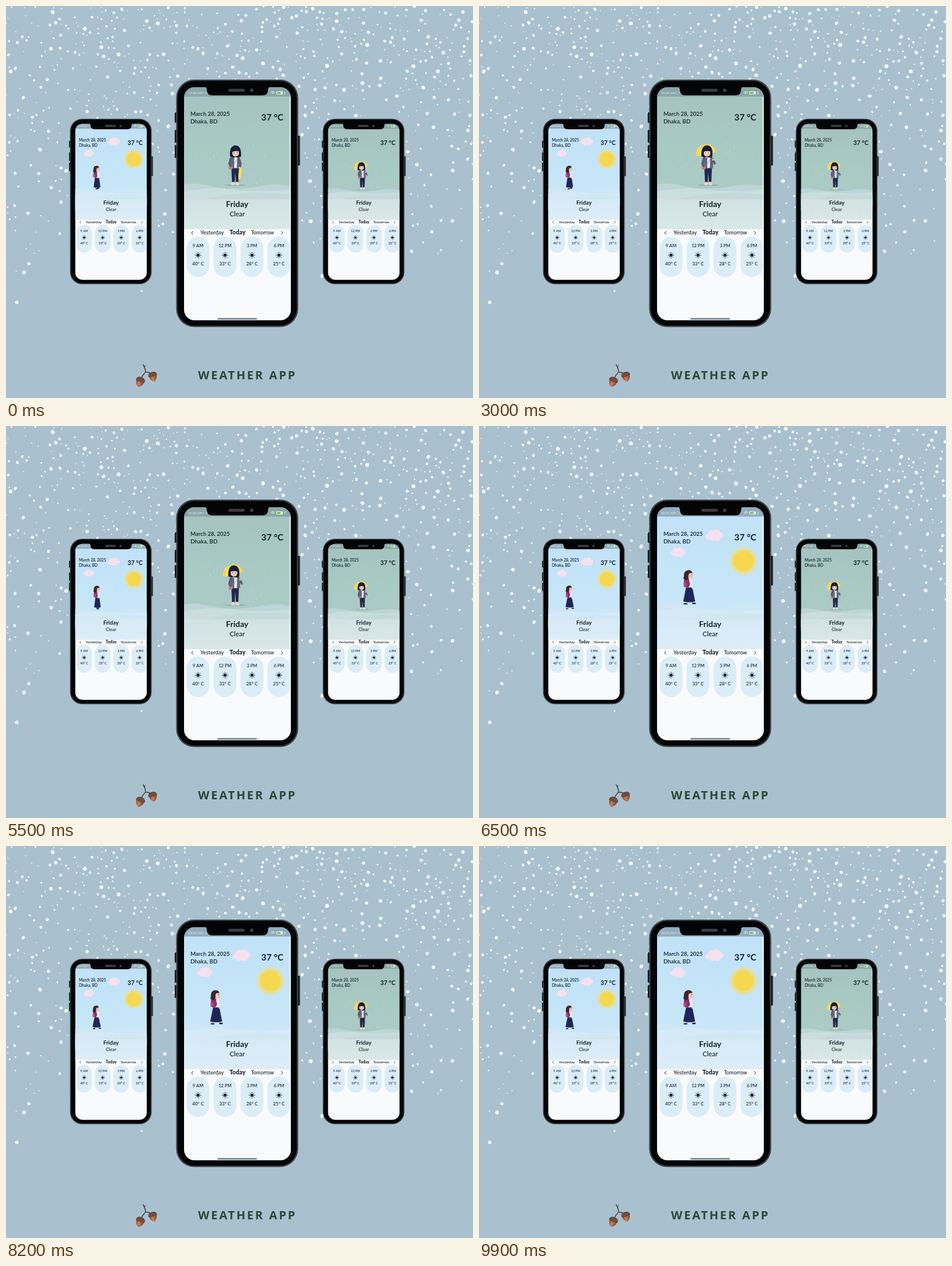
Animation of 800x671 px, one loop 10000 ms. Source, as an HTML page with a canvas:

```html
<!DOCTYPE html>
<html lang="en">
<head>
<meta charset="utf-8">
<title>Weather app</title>
<style>
html, body { margin: 0; width: 100%; height: 100%; overflow: hidden; background: #a9c1cf; }
canvas { display: block; }
</style>
</head>
<body>
<canvas id="stage" width="800" height="671"></canvas>
<script>
const ctx = document.getElementById('stage').getContext('2d');
const LOOP = 10000, SUNNY_AT = 5600;
const mix = (a, b, k) => a + (b - a) * k;
const ease = (t, from, to) => {
  const k = Math.min(1, Math.max(0, (t - from) / (to - from)));
  return k * k * (3 - 2 * k);
};

function box(x, y, w, h, r, color) {
  ctx.fillStyle = color;
  ctx.beginPath();
  ctx.roundRect(x, y, w, h, r);
  ctx.fill();
}
function oval(x, y, rx, ry, color, turn = 0) {
  ctx.fillStyle = color;
  ctx.beginPath();
  ctx.ellipse(x, y, rx, ry, turn, 0, 7);
  ctx.fill();
}
function shape(d, color) {
  ctx.fillStyle = color;
  ctx.fill(new Path2D(d));
}
function line(d, color, width) {
  ctx.strokeStyle = color;
  ctx.lineWidth = width;
  ctx.lineCap = ctx.lineJoin = 'round';
  ctx.stroke(new Path2D(d));
}
function text(s, x, y, size, weight = 400, align = 'left', color = '#15222b') {
  ctx.font = `${weight} ${size}px Lato, sans-serif`;
  ctx.textAlign = align;
  ctx.fillStyle = color;
  ctx.fillText(s, x, y);
}
function fade(y0, y1, ...colors) {
  const g = ctx.createLinearGradient(0, y0, 0, y1);
  colors.forEach((c, i) => g.addColorStop(i / (colors.length - 1), c));
  return g;
}

// Snow thins out towards the bottom; flakes keep their distance.
let seed = 41;
const rand = () => (seed = seed * 16807 % 2147483647) / 2147483647;
const flakes = [];
for (let tries = 0; flakes.length < 880 && tries < 20000; tries++) {
  const x = rand() * 800, y = rand() * 537, r = 0.9 + 2.5 * rand() ** 1.7;
  if (rand() > (1 - y / 545) ** 1.45) continue;
  if (flakes.some(f => Math.hypot(f.x - x, f.y - y) < f.r + r + 3)) continue;
  flakes.push({ x, y, r, flat: 0.78 + rand() * 0.22, turn: rand() * 3 });
}

function cloud(x, y, s) {
  for (const [dx, dy, r] of [[-10, 2, 5], [-4, -3, 6], [4, -4, 6.5], [10, 0, 5.5], [-3, 4, 6], [5, 5, 5.5]])
    oval(x + dx * s, y + dy * s, r * s, r * s * 0.95, '#f7e1ee');
}

function umbrella(open, lift) {
  const x = mix(mix(401, 406, open), 389, lift), y = mix(mix(287, 276, open), 253, lift);
  const rx = mix(mix(2.6, 14, open), 17, lift), ry = mix(mix(11, 15, open), 16.5, lift);
  const low = mix(ry, 2, lift);
  ctx.save();
  ctx.translate(x, y);
  ctx.rotate(mix(0.12, -0.24, lift));
  ctx.fillStyle = '#f6dc5c';
  ctx.beginPath();
  ctx.ellipse(0, 0, rx, ry, 0, Math.PI, 2 * Math.PI);
  ctx.ellipse(0, 0, rx, low, 0, 0, Math.PI);
  ctx.fill();
  if (open > 0.4) {
    const top = -ry * lift;
    for (const k of [-0.9, -0.35, 0.35, 0.9])
      line(`M0 ${top} Q${rx * k} ${top * 0.5} ${rx * k} ${low * 0.5}`, '#e7c443', 0.6);
    line(`M0 ${top} V${top - 2}`, '#d7b142', 1);
  } else {
    line(`M0 -11 V-15 M0 11 V14`, '#8a7150', 0.8);
  }
  ctx.restore();
}

function rainGirl(t, open, lift) {
  const front = open * (1 - lift);
  const sway = 0.6 * Math.sin(t / 420) * lift;
  const hx = 393 + 3 * front - 3 * lift + sway;
  oval(393, 306.5, 18, 1, '#90aaa9');
  if (lift > 0.45) {
    umbrella(open, lift);
    line(`M394 245 L401 278`, '#746b61', 0.9);
  }
  // legs and shoes
  shape('M386 275 H399 L398 302 H393.7 L392.8 284 L391.7 302 H387.2Z', '#20274a');
  box(387.4, 301, 4, 3, 0, '#efc6b4');
  box(394, 301, 4, 3, 0, '#efc6b4');
  box(385.8, 303.5, 6, 3, 1.3, '#e9e4e6');
  box(393.4, 303.5, 6, 3, 1.3, '#e9e4e6');
  // jacket, shirt and bag
  shape('M387 258 Q392 256 398 258 L402 264 L400 277 Q393 280 385 277 L382 265Z', '#61677f');
  shape('M391 258 H396 L395.5 277 H391Z', '#e9edf2');
  line('M398 260 L386 276', '#a87c6e', 0.7);
  box(381.5, 272.5, 6.5, 7.5, 2, '#bf8278');
  line('M385 261 L382.5 270 L385 274', '#555b75', 3.4);
  const hand = [mix(mix(400, 402, front), 401, lift), mix(mix(277, 271, front), 263, lift)];
  line(`M399 261 L${mix(402, 404, lift)} 270 L${hand}`, '#555b75', 3.2);
  oval(...hand, 1.7, 1.7, '#f0c8b8');
  // head
  ctx.save();
  ctx.translate(hx, 249);
  ctx.rotate(0.13 * front + 0.05 * lift);
  box(-2, 5, 4, 6, 1, '#efc2b3');
  shape('M-9 9 Q-11 -10 0 -10.5 Q11 -10 9.5 9 Q5 11 0 9.5 Q-5 11 -9 9Z', '#171d39');
  box(-5.3, -4, 11.3, 12.5, 5, '#f5d2c5');
  shape('M-6 -5 H7 V0 Q0 -2 -6 1Z', '#171d39');
  oval(-2.3, 2.1, 0.7, 0.8, '#242337');
  oval(3.1, 2.1, 0.7, 0.8, '#242337');
  oval(-3.5, 4.5, 1.3, 0.8, '#eda99f');
  oval(4, 4.5, 1.3, 0.8, '#eda99f');
  line('M-.5 5.8 Q.5 6.5 1.5 5.8', '#bb6265', 0.6);
  ctx.restore();
  if (lift <= 0.45) {
    umbrella(open, lift);
    if (front > 0.5) oval(398, 268, 1.7, 1.7, '#f0c8b8');
  }
}

function sunGirl(t) {
  const phase = Math.PI * (t - 8900) / 425;
  const step = Math.sin(phase), bob = -0.7 * Math.abs(step);
  ctx.save();
  ctx.translate(1.1 * Math.cos(phase / 2), bob);
  for (const side of [-1, 1]) {
    const fx = 361 + side * step * 8, up = Math.max(0, side * Math.cos(phase)) * 1.5;
    line(`M361 295 L${fx} ${303 - up}`, '#efc1ae', 2);
    line(`M${fx - 1} ${305 - up} h4`, '#292337', 2.4);
  }
  const spread = 2.5 * Math.abs(step);
  shape(`M356 275 H366 L${369 + spread} 301 Q361 304 ${353 - spread} 301Z`, '#20285a');
  line('M360 280 L357 300 M363 279 L367 300', '#151b43', 0.7);
  shape('M357 262 Q363 260 366 264 L367 277 H355Z', '#eee8f1');
  box(352, 262, 9, 15, 4, '#8d2f70');
  box(351.4, 268, 5, 8, 2, '#b34786');
  line('M360 263 Q364 268 360 275', '#732458', 1.4);
  const swing = 3 * step;
  line(`M362 265 L${363 + swing * 0.4} 271 L${364 + swing} 277`, '#f0e6ed', 2.5);
  oval(364 + swing, 278, 1.4, 1.4, '#efc1ae');
  box(359, 257, 4, 6, 1, '#ecb9a4');
  oval(362, 255.5, 5.2, 6.1, '#f3c9b5');
  shape('M367 252 L368.8 256 L366.5 257Z', '#f3c9b5');
  shape('M366.5 252 Q365 247 359 247.5 Q351 249 352 258 Q350 262 353 264 Q358 266 360 261 Q359 256 361 253Z', '#3c2631');
  oval(365.2, 255, 0.6, 0.8, '#2a2029');
  line('M364.8 259 h1.5', '#b95d5e', 0.6);
  ctx.restore();
}

function rain(t) {
  for (let i = 0; i < 26; i++) {
    const x = 342 + (i * 47.3) % 108, y = 232 + (i * 31.7 + t * 0.075) % 70;
    line(`M${x} ${y} l-.7 ${1 + i % 3}`, 'rgba(232,245,244,.48)', 0.7);
  }
}

function scene(t, sunny, open, lift) {
  box(300, 130, 195, 251, 0, sunny
    ? fade(150, 330, '#c1e1f7', '#c4e5f8', '#c9e7f7')
    : fade(150, 330, '#a5c3bf', '#a9c9c3', '#accbc6'));
  if (sunny) {
    oval(453, 231, 25, 25, 'rgba(244,221,126,.35)');
    oval(453, 231, 21.5, 21.5, 'rgba(244,220,105,.55)');
    oval(453, 231, 17.5, 17.5, '#f5d84f');
    cloud(403, 187, 1);
    cloud(340.5, 216, 0.85);
  }
  shape('M300 306 Q325 301 350 308 Q390 317 435 308 Q467 302 495 310 V350 H300Z', sunny ? '#cfe7f5' : '#bdd5d6');
  shape('M300 319 Q345 308 390 314 Q430 320 495 313 V360 H300Z', sunny ? '#d5eaf6' : '#cadede');
  shape('M345 331 Q410 312 495 324 V345 H345Z', sunny ? '#d0e7f4' : '#c3d9da');
  box(300, 331, 195, 51, 0, sunny ? fade(331, 381, '#d6eaf6', '#dcedf7') : fade(331, 381, '#d1e2e2', '#d8e8e7'));
  if (sunny) sunGirl(t);
  else {
    rain(t);
    rainGirl(t, open, lift);
  }
}

function sunIcon(x, y) {
  oval(x, y, 2.7, 2.7, '#17262d');
  for (let i = 0; i < 8; i++) {
    const a = i * Math.PI / 4, c = Math.cos(a), s = Math.sin(a);
    line(`M${x + 3.8 * c} ${y + 3.8 * s} L${x + 5 * c} ${y + 5 * s}`, '#17262d', 1);
  }
}

function app(t, sunny, open, lift, clock) {
  box(300, 380, 195, 170, 0, '#f9fafb');
  scene(t, sunny, open, lift);
  box(300, 130, 195, 25, 0, sunny ? '#91adbe' : '#8aa6a8');
  text(clock, 312, 151, 5.6, 400, 'left', '#e9f1f3');
  line('M454 148 q3 -3 6 0 M455.5 149.5 q1.5 -1.5 3 0', '#f4f8f8', 1);
  box(463, 146, 11, 5.5, 1.3, '#eaf1ef');
  box(464, 147, 6.5, 3.5, 0.7, '#75c947');
  line('M478 146.5 l-1.2 2.5 h1.6 l-1 2.2', '#eff5f2', 0.7);

  text('March 28, 2025', 316, 187.5, 9.6, 600);
  text('Dhaka, BD', 316, 200.5, 9.8, 600);
  text('37 °C', 475, 196, 15.2, 700, 'right');
  text('Friday', 396, 344, 14, 700, 'center');
  text('Clear', 396, 360, 11.4, 500, 'center');

  text('Yesterday', 353, 391, 9.4, 500, 'center');
  text('Today', 396.5, 391.3, 10.3, 800, 'center');
  text('Tomorrow', 439.5, 391, 8.8, 500, 'center');
  line('M320.2 385.8 l-2.3 2.5 2.3 2.5 M471.8 385.8 l2.3 2.5 -2.3 2.5', '#15222b', 1);

  [['9 AM', 40], ['12 PM', 33], ['3 PM', 28], ['6 PM', 25]].forEach(([hour, temp], i) => {
    const x = 329 + i * 46.2;
    box(x - 19.5, 395, 39, 69, 19.5, '#dbedf7');
    text(hour, x, 413, 7.5, 500, 'center');
    sunIcon(x, 426.5);
    text(temp + '° C', x, 444, 8, 500, 'center');
  });
}

function phone(x, y, scale, content) {
  ctx.save();
  ctx.translate(x, y);
  ctx.scale(scale, scale);
  ctx.translate(-292, -126);
  for (const [bx, by, h] of [[289, 182, 18], [289, 212, 22], [289, 238, 22], [499, 222, 51]])
    box(bx, by, 4.5, h, 1.5, '#191b1e');
  box(291.5, 126, 209, 423.5, 31, '#3e4144');
  box(293.8, 128.2, 204.4, 419, 29, '#030405');
  ctx.beginPath();
  ctx.roundRect(305, 139, 183, 399, 18);
  ctx.restore();

  ctx.save();
  ctx.clip();
  content();
  ctx.restore();

  ctx.save();
  ctx.translate(x, y);
  ctx.scale(scale, scale);
  ctx.translate(-292, -126);
  shape('M338 138 Q344 138 344 143 Q344 153 354 153 H439 Q449 153 449 143 Q449 138 455 138Z', '#030405');
  box(381, 141.8, 28, 5, 2.5, '#3c3e42');
  oval(421, 144.2, 3, 3, '#3b3d43');
  ctx.restore();
}

function sidePhone(x, t, sunny) {
  phone(x, 193, 0.669, () => {
    ctx.translate(x + 15, 230);
    ctx.scale(0.686, 0.686);
    ctx.translate(-316, -184);
    app(t, sunny, 1, 1, sunny ? '10:33 AM | 1' : '10:29 AM | 1');
  });
}

function acorn(x, y, turn, size) {
  ctx.save();
  ctx.translate(x, y);
  ctx.rotate(turn);
  ctx.scale(size, size);
  const g = ctx.createLinearGradient(-7, 0, 7, 0);
  g.addColorStop(0, '#85462d');
  g.addColorStop(0.4, '#c98058');
  g.addColorStop(1, '#7f412b');
  shape('M-7 -1 Q-7 7 0 11 Q7 7 7 -1Z', g);
  shape('M-8 0 Q-8 -7 0 -7 Q8 -7 8 0 Q0 3 -8 0Z', '#634339');
  line('M-6 -2 Q0 1 6 -2 M-5 -4 Q0 -2 5 -4', '#8c6654', 0.8);
  ctx.restore();
}

function footer() {
  line('M235 614 Q239 620 239 627 Q235 630 232 637 M239 627 Q244 626 249 630', '#493a35', 1.5);
  line('M237 618 l2 -3', '#493a35', 1);
  acorn(230, 642, 0.35, 1);
  acorn(251.5, 633, -0.25, 0.96);
  ctx.font = '700 20px "Open Sans", sans-serif';
  ctx.letterSpacing = '2.8px';
  ctx.textAlign = 'left';
  ctx.fillStyle = '#294735';
  ctx.fillText('WEATHER APP', 329, 639);
  ctx.letterSpacing = '0px';
}

function draw(now) {
  const t = now % LOOP, sunny = t >= SUNNY_AT;
  ctx.fillStyle = '#a9c1cf';
  ctx.fillRect(0, 0, 800, 671);
  for (const f of flakes) oval(f.x, f.y, f.r, f.r * f.flat, '#fbfcfd', f.turn);
  sidePhone(110, t, true);
  sidePhone(543, t, false);
  phone(292, 126, 1, () => {
    const clock = sunny ? '10:31 AM | 1' : t < 1200 ? '10:30 AM | S' : '10:30 AM | 7';
    app(t, sunny, ease(t, 1200, 1800), ease(t, 2200, 2900), clock);
    box(485.5, 155, 2.5, 383, 0, 'rgba(235,246,248,.65)');
    box(362, 534, 68, 3, 1.5, '#7d919f');
  });
  footer();
  requestAnimationFrame(() => draw(performance.now()));
}
draw(performance.now());
</script>
</body>
</html>
```
